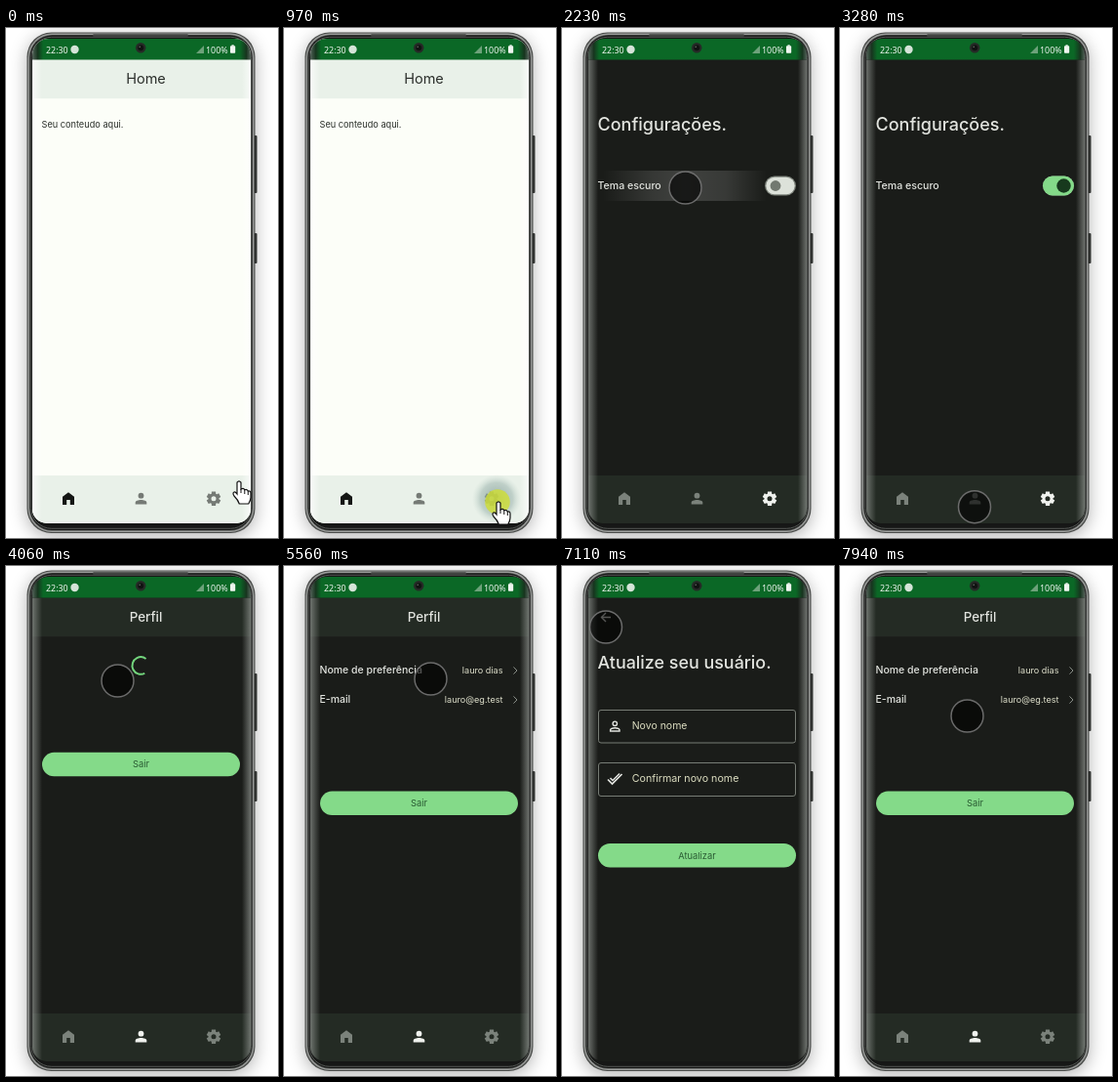
Animation, 279 px wide and 522 px high, one loop 8000 ms. Source, as an HTML page with a canvas:

```html
<!DOCTYPE html>
<html lang="pt">
<head>
<meta charset="utf-8">
<style>
html, body { margin: 0; width: 100%; height: 100%; overflow: hidden; background: #fff; }
canvas { display: block; width: 279px; height: 522px; }
</style>
</head>
<body>
<canvas id="stage"></canvas>
<script>
const W = 279, H = 522, LOOP = 8000, TAU = Math.PI * 2;
const canvas = document.getElementById('stage');
const ctx = canvas.getContext('2d');
const dpr = window.devicePixelRatio || 1;
canvas.width = W * dpr;
canvas.height = H * dpr;

const SANS = 'Inter, "Open Sans", sans-serif';
const GREEN = '#84da89';
const LIGHT = { bg: '#fcfef8', bar: '#e9f1e9', text: '#2b2f2b', on: '#141614', off: '#757a75' };
const DARK = { bg: '#1a1c19', bar: '#242b24', text: '#e2e4df', on: '#f0f2ee', off: '#7b827b' };

// Scene times in ms
const OPEN_SETTINGS = 1200, GO_DARK = 2180, OPEN_PROFILE = 3400,
      LOADED = 4230, OPEN_EDIT = 5880, GO_BACK = 7340;

const HAND = [[0, 239, 464], [250, 239, 464], [830, 220, 485], [1250, 220, 485]];
const TOUCH = [[1250, 214, 470], [1950, 126.5, 163.5], [2400, 126.5, 163.5], [2980, 138, 504],
  [3300, 138, 490], [3450, 138, 484], [4060, 114.5, 117.5], [4700, 119, 118], [5450, 150.5, 115.5],
  [5950, 150.5, 115.5], [7000, 45, 62.5], [7360, 45, 62.5], [7900, 130.5, 153.5]];

const clamp = v => Math.max(0, Math.min(1, v));
const part = (t, a, b) => clamp((t - a) / (b - a));
const ease = p => p * p * (3 - 2 * p);

function along(keys, t) {
  let i = 0;
  while (i < keys.length - 2 && t >= keys[i + 1][0]) i++;
  const [a, x0, y0] = keys[i], [b, x1, y1] = keys[i + 1];
  const p = ease(part(t, a, b));
  return [x0 + (x1 - x0) * p, y0 + (y1 - y0) * p];
}

function fillBox(x, y, w, h, color, r = 0) {
  ctx.beginPath();
  ctx.roundRect(x, y, w, h, r);
  ctx.fillStyle = color;
  ctx.fill();
}

function strokeBox(x, y, w, h, color, r, line = 1) {
  ctx.beginPath();
  ctx.roundRect(x, y, w, h, r);
  ctx.strokeStyle = color;
  ctx.lineWidth = line;
  ctx.stroke();
}

function disc(x, y, r, color) {
  ctx.beginPath();
  ctx.arc(x, y, r, 0, TAU);
  ctx.fillStyle = color;
  ctx.fill();
}

function line(points, color, width) {
  ctx.beginPath();
  points.forEach(([x, y]) => ctx.lineTo(x, y));
  ctx.strokeStyle = color;
  ctx.lineWidth = width;
  ctx.stroke();
}

function text(str, x, y, size, color, { weight = 400, align = 'left', face = SANS } = {}) {
  ctx.font = `${weight} ${size}px ${face}`;
  ctx.textAlign = align;
  ctx.fillStyle = color;
  ctx.fillText(str, x, y);
}

function across(x0, x1, ...stops) {
  const g = ctx.createLinearGradient(x0, 0, x1, 0);
  stops.forEach(([p, c]) => g.addColorStop(p, c));
  return g;
}

function shape(x, y, d, color) {
  ctx.save();
  ctx.translate(x, y);
  ctx.fillStyle = color;
  ctx.fill(new Path2D(d), 'evenodd');
  ctx.restore();
}

function homeIcon(x, y, color) {
  shape(x, y, 'M0-6.5 L6-2 V6.2 H1.8 V1.2 H-1.8 V6.2 H-6 V-2Z', color);
}

function personIcon(x, y, color) {
  disc(x, y - 3, 2.9, color);
  shape(x, y, 'M-5.8 5.7 V4 C-5.8 .3 5.8 .3 5.8 4 V5.7Z', color);
}

function gearIcon(x, y, color) {
  ctx.save();
  ctx.translate(x, y);
  ctx.beginPath();
  for (let i = 0; i < 6; i++) {
    const a = i * TAU / 6;
    [[-.42, 5.5], [-.28, 7.5], [.28, 7.5], [.42, 5.5]].forEach(([d, r]) =>
      ctx.lineTo(Math.sin(a + d) * r, Math.cos(a + d) * r));
  }
  ctx.closePath();
  ctx.moveTo(2.5, 0);
  ctx.arc(0, 0, 2.5, 0, TAU);
  ctx.fillStyle = color;
  ctx.fill('evenodd');
  ctx.restore();
}

function drawBody() {
  ctx.save();
  ctx.shadowColor = 'rgba(0,0,0,.3)';
  ctx.shadowBlur = 18 * dpr;
  ctx.shadowOffsetY = 4 * dpr;
  fillBox(21.5, 4.5, 234, 512.5, '#4a4c4a', 25);
  ctx.restore();
  fillBox(254.5, 110, 3, 59, '#303230', 1);
  fillBox(254.5, 210, 3, 31, '#303230', 1);
  strokeBox(23.3, 6.3, 230.4, 509, '#999b99', 24, 1.4);
  fillBox(24.5, 7.5, 228, 506.5, '#161716', 23);
  strokeBox(25.7, 9.3, 225.8, 503, '#5a5d5a', 21, .9);
  fillBox(89, 6.3, 98, 2.5, '#434543', 1.2);
}

function drawStatus() {
  fillBox(27, 11, 224, 21.5, across(27, 251, [0, '#526158'], [.025, '#17351f'],
    [.05, '#0b6826'], [.95, '#0b6826'], [.98, '#17351f'], [1, '#526158']));
  const face = '"Noto Sans", "Open Sans", sans-serif';
  text('22:30', 41, 25.7, 8.9, '#eef5ef', { face });
  text('100%', 205, 25.7, 8.9, '#eef5ef', { face });
  disc(70.5, 22, 4.2, '#d5e4d8');
  shape(195, 26, 'M0 0 L8-8 V0Z', '#6da27a');
  fillBox(230, 18.3, 5.2, 7.5, '#eef5ef', .8);
  fillBox(231.5, 17.2, 2.2, 1.5, '#eef5ef');
  disc(138.2, 20.3, 5.2, '#262a27');
  disc(138.2, 20.3, 3, '#111312');
  disc(137.2, 19.3, .8, '#697069');
}

function drawHeader(title, c, size, weight) {
  fillBox(27, 32.5, 224, 39.8, c.bar);
  text(title, 143.5, 57, size, c.text, { weight, align: 'center' });
}

function drawNav(active, c) {
  fillBox(27, 458, 224, 49, c.bar);
  [homeIcon, personIcon, gearIcon].forEach((icon, i) =>
    icon(64 + i * 74.5, 481.7, i === active ? c.on : c.off));
}

function button(label, y) {
  fillBox(37, y, 203, 24.5, GREEN, 12.25);
  text(label, 138.5, y + 15.5, 9.3, '#2a5c33', { align: 'center' });
}

function homePage(t) {
  drawHeader('Home', LIGHT, 14.5, 400);
  text('Seu conteudo aqui.', 36.5, 102, 9.2, LIGHT.text);
  drawNav(0, LIGHT);
  const press = ease(part(t, 840, 950));
  if (press) {
    ctx.globalAlpha = press;
    const g = ctx.createRadialGradient(218, 482, 4, 218, 482, 25);
    g.addColorStop(0, 'rgba(120,150,145,.65)');
    g.addColorStop(.6, 'rgba(150,175,168,.5)');
    g.addColorStop(1, 'rgba(190,210,200,0)');
    disc(218, 482, 25, g);
    ctx.globalAlpha = 1;
  }
}

function settingsPage(t, c) {
  text('Configurações.', 36.5, 105, 18, c.text, { weight: 500 });
  const glow = part(t, 2080, 2200) * (1 - part(t, 2300, 2480));
  if (glow) {
    ctx.globalAlpha = glow;
    const tint = a => c === DARK ? `rgba(255,255,255,${a})` : `rgba(0,0,0,${a})`;
    fillBox(42, 146, 168, 31, across(42, 210, [0, tint(0)], [.3, tint(.12)],
      [.5, tint(.17)], [.75, tint(.13)], [1, tint(0)]));
    ctx.globalAlpha = 1;
  }
  text('Tema escuro', 36.5, 165, 10.6, c.text, { weight: 500 });
  const on = ease(part(t, 2250, 2420));
  fillBox(208, 151.5, 32, 20, '#7c827a', 10);
  fillBox(209.3, 152.8, 29.4, 17.4, '#dde2da', 8.7);
  if (on) {
    ctx.globalAlpha = on;
    fillBox(208, 151.5, 32, 20, GREEN, 10);
    ctx.globalAlpha = 1;
  }
  disc(219 + on * 10.5, 161.5, 5.4 + on * 1.8, on > .5 ? '#17391d' : '#727970');
  drawNav(2, c);
}

function profilePage(t) {
  drawHeader('Perfil', DARK, 13.4, 500);
  if (t < LOADED) {
    const a = (t - 4060) / 1000 * TAU;
    ctx.beginPath();
    ctx.arc(138.3, 102, 8.8, a + 1.1, a + 5.35);
    ctx.strokeStyle = '#73d57d';
    ctx.lineWidth = 2;
    ctx.stroke();
    button('Sair', 190.8);
  } else {
    [['Nome de preferência', 'lauro dias', 107], ['E-mail', 'lauro@eg.test', 137]]
      .forEach(([label, value, y]) => {
        text(label, 36.5, y + 3.3, 10.5, DARK.text, { weight: 500 });
        text(value, 224.5, y + 3.2, 9.1, '#dedfcb', { align: 'right' });
        line([[235.5, y - 3.6], [239, y], [235.5, y + 3.6]], '#8b918a', 1);
      });
    button('Sair', 230.6);
  }
  drawNav(1, DARK);
}

function editPage() {
  line([[50, 52.5], [40.5, 52.5]], DARK.text, 1.4);
  line([[45, 48], [40.5, 52.5], [45, 57]], DARK.text, 1.4);
  text('Atualize seu usuário.', 36.5, 105, 17.9, DARK.text, { weight: 500 });
  strokeBox(37.5, 147.5, 202, 33.5, '#777c75', 2.5);
  strokeBox(37.5, 201.5, 202, 34, '#777c75', 2.5);
  ctx.beginPath();
  ctx.arc(54.3, 161.3, 2.2, 0, TAU);
  ctx.strokeStyle = DARK.text;
  ctx.lineWidth = 1.4;
  ctx.stroke();
  ctx.save();
  ctx.translate(54.3, 164);
  ctx.stroke(new Path2D('M-4.7 5 V3.7 C-4 1 4 1 4.7 3.7 V5Z'));
  ctx.restore();
  line([[47, 218.5], [51.5, 223], [61.5, 213]], DARK.text, 1.7);
  line([[49.5, 217], [52, 219.5], [59, 212.5]], DARK.text, 1.5);
  text('Novo nome', 71.7, 167.3, 10.5, '#dcddc0');
  text('Confirmar novo nome', 71.7, 221.3, 10.7, '#dcddc0');
  button('Atualizar', 284);
}

function drawEdges(dark) {
  const [rgb, a] = dark ? ['145,150,145', .68] : ['255,255,255', .7];
  const tone = o => `rgba(${rgb},${o})`;
  fillBox(27, 32.5, 10, 475, across(27, 37, [0, tone(a)], [.45, tone(a * .55)], [1, tone(0)]));
  fillBox(242, 32.5, 9, 475, across(242, 251, [0, tone(0)], [.55, tone(a * .55)], [1, tone(a)]));
}

function drawCursor(t) {
  if (t < 1250) {
    const [x, y] = along(HAND, t);
    const glow = part(t, 840, 900) * (1 - part(t, 1120, 1230));
    if (glow) disc(219, 485, 12.8, `rgba(207,222,50,${glow * .8})`);
    const hand = new Path2D('M-2 1.2 Q0-1.5 2 1.2 V8 Q4.5 6.5 5.8 8.7 Q8 7.7 9.3 10 ' +
      'Q12 9.4 12 12.2 V16.5 Q12 19 9.8 23 H.3 Q-1 19-5 15 Q-7 11.8-5 11 Q-3.8 10.5-2 13Z');
    ctx.save();
    ctx.translate(x, y);
    ctx.fillStyle = '#fff';
    ctx.fill(hand);
    ctx.strokeStyle = '#111';
    ctx.lineWidth = 1.2;
    ctx.stroke(hand);
    [[2, 8], [5.8, 9], [9.3, 10]].forEach(([hx, hy]) => line([[hx, hy], [hx, hy + 4]], '#111', 1));
    ctx.restore();
    return;
  }
  const [x, y] = along(TOUCH, t);
  disc(x, y, 17, 'rgba(0,0,0,.62)');
  ctx.beginPath();
  ctx.arc(x, y, 16.5, 0, TAU);
  ctx.strokeStyle = 'rgba(132,132,132,.8)';
  ctx.lineWidth = 1.5;
  ctx.stroke();
}

function draw(t) {
  const dark = t >= GO_DARK, c = dark ? DARK : LIGHT;
  ctx.setTransform(dpr, 0, 0, dpr, 0, 0);
  fillBox(0, 0, W, H, '#fff');
  drawBody();
  ctx.save();
  ctx.beginPath();
  ctx.roundRect(27, 11, 224, 496, [17, 17, 15, 15]);
  ctx.clip();
  fillBox(27, 11, 224, 496, c.bg);
  if (t < OPEN_SETTINGS) homePage(t);
  else if (t < OPEN_PROFILE) settingsPage(t, c);
  else if (t >= OPEN_EDIT && t < GO_BACK) editPage();
  else profilePage(t);
  drawEdges(dark);
  drawStatus();
  ctx.restore();
  drawCursor(t);
}

const start = performance.now();
function tick() {
  draw((performance.now() - start) % LOOP);
  requestAnimationFrame(tick);
}
tick();
</script>
</body>
</html>
```
